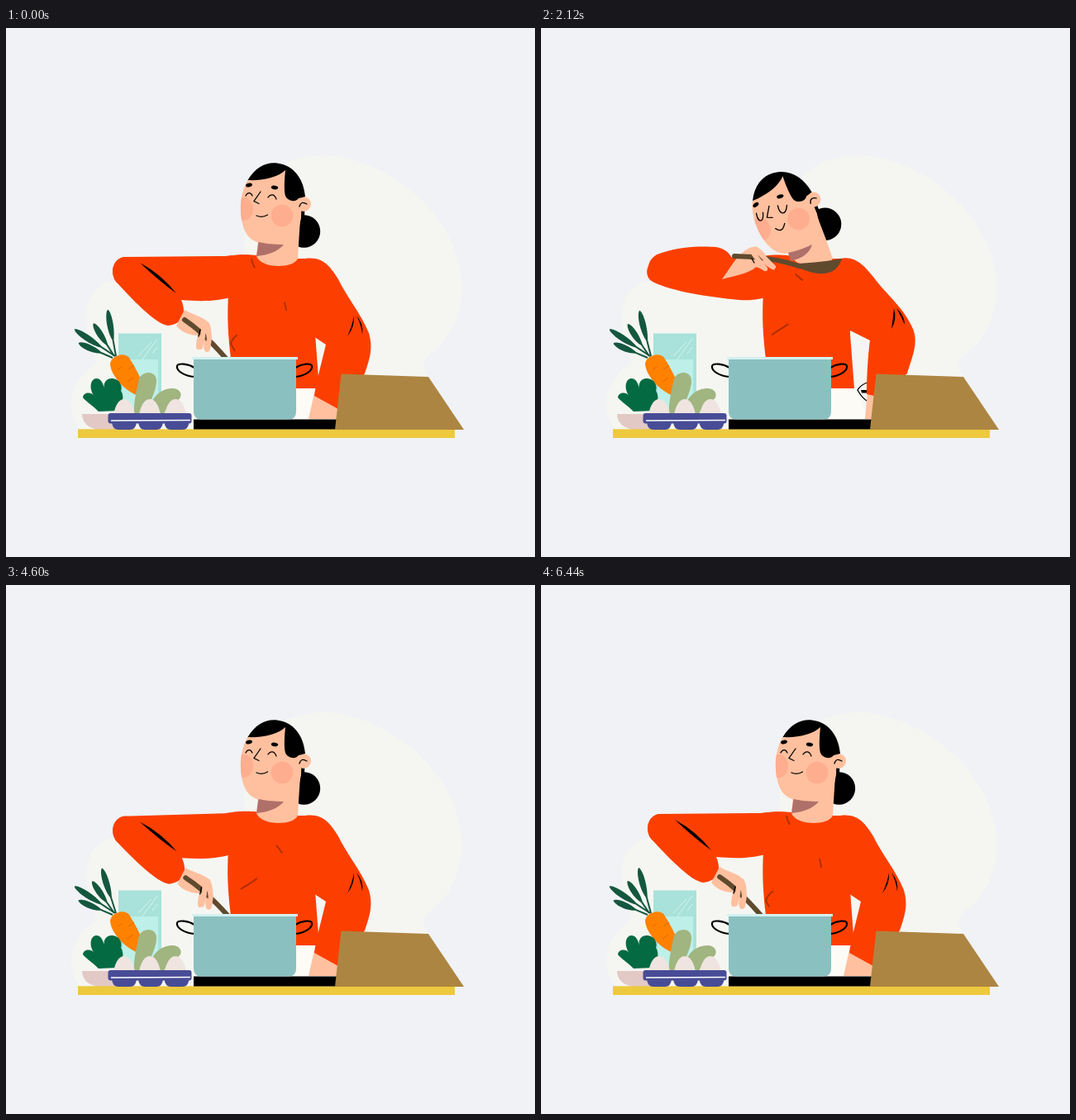
Write an HTML page that moves like this. It is 640 px wide and 640 px high and loops after 6480 ms.

```html
<!DOCTYPE html>
<html lang="en">
<head>
<meta charset="utf-8">
<title>Cooking</title>
<style>
html, body { margin: 0; width: 100%; height: 100%; overflow: hidden; background: #f0f2f5; }
svg { display: block; width: 100vw; height: 100vh; }
.line { fill: none; stroke: #000; stroke-width: 1.3; stroke-linecap: round; }
.skin { fill: #ffc09f; }
.top { fill: #fc3f00; }
.cheek { fill: #ffad8f; }
.crease { fill: none; stroke: #b02e00; stroke-width: 2; }
.finger { fill: none; stroke: #ffc09f; stroke-width: 6; stroke-linecap: round; }
</style>
</head>
<body>
<svg viewBox="0 0 640 640">
  <path fill="#f5f6f2" d="M90 486C70 460 78 425 110 405C95 370 85 315 130 306C220 300 285 320 289 262C285 200 320 154 385 154C450 154 551 220 551 315C551 355 530 385 512 395C500 405 508 415 510 422L540 486Z"/>
  <path fill="#fcfbf5" d="M340 434H380L396 473H340Z"/>

  <!-- glass -->
  <path fill="#a8e2da" d="M136 369.500H188V470H136Z"/>
  <path fill="#bdf0e8" d="M141 401H184V466H141Z"/>
  <path fill="none" stroke="#d5f5f0" d="M160 397L176 380M165 401L183 376M177 394L183 386"/>

  <!-- carrot and greens -->
  <g id="leaves" fill="#14573f"></g>
  <path fill="#ff8100" d="M126 407C126 397 143 391 149 399C158 413 168 432 170 447C152 447 128 425 126 407Z"/>
  <path fill="none" stroke="#dc6900" d="M135 413L140 410M148 413L155 408M147 428L154 423"/>
  <path fill="#046a41" d="M112 464C104 456 98 453 93 447C94 440 104 440 107 446C100 436 102 425 109 424C116 424 118 432 119 437C117 429 122 423 129 424C138 425 141 433 139 439C143 444 142 456 136 463Z"/>
  <path fill="#e3c9c5" d="M92 467H145V486H116C101 486 92 478 92 467Z"/>
  <g fill="#a1b580">
    <path d="M155 470C154 452 158 440 160 428C162 414 183 413 182 428C181 444 172 450 173 470Z"/>
    <path d="M170 470C175 446 187 436 202 436C214 437 215 449 204 452C195 456 192 465 190 470Z"/>
  </g>
  <g fill="#efe4df">
    <path id="egg" d="M130 468C132 456 137 449 143 449C149 449 154 456 156 468Z"/>
    <use href="#egg" x="31"/><use href="#egg" x="62"/>
  </g>
  <rect x="87" y="485.300" width="456" height="10.700" fill="#edc93d"/>
  <g fill="#484c96">
    <rect x="123.500" y="466" width="101" height="12.500" rx="3"/>
    <path id="cup" d="M128 477H158Q157 486 150 486H136Q129 486 128 477Z"/>
    <use href="#cup" x="32"/><use href="#cup" x="63.500"/>
  </g>
  <path stroke="#fff" stroke-width="1.500" d="M127 475L223 474.500"/>
  <rect x="227" y="473.500" width="187" height="12"/>

  <!-- cook -->
  <path class="line" d="M397 428Q386 432 383 438Q388 447 394 451"/>
  <path d="M387 438H398V441.500H388Z"/>
  <path id="torso" class="top"/>
  <path id="wrist" class="skin"/>
  <path id="sleeve" class="top"/>
  <path id="folds"/>
  <path id="upper" class="top"/>
  <path id="crease1" class="crease" d="M297 279C300 304 336 306 339 342" stroke-dasharray="12 55.400"/>
  <path id="crease2" class="crease" d="M310 346C304 362 276 366 272 382L277 391" stroke-dasharray="24 41"/>
  <g class="turn">
    <circle cx="360.500" cy="246" r="19.700"/>
    <path d="M350 205H362L361 228L365 232L354 240Z"/>
  </g>
  <path id="neck" class="skin"/>
  <g class="turn">
    <clipPath id="faceClip"><path id="face" d="M293 183C285 195 282 215 285 232C288 250 297 260 311 260L350 262L357 230L358 200L340 168Z"/></clipPath>
    <use href="#face" class="skin"/>
    <ellipse class="cheek" cx="287.500" cy="219" rx="11.500" ry="14" clip-path="url(#faceClip)"/>
    <circle class="cheek" cx="334" cy="227" r="13.300"/>
    <circle class="skin" cx="360" cy="213" r="9"/>
    <path d="M292.500 184C302 168 315 162 328 163.500C348 166 360 182 362 204L354 206C351 211 341 210 338 203C336 196 337 182 338 172C330 180 312 185 292.500 184Z"/>
    <ellipse cx="294" cy="190" rx="4" ry="2.300" transform="rotate(-14 294 190)"/>
    <ellipse cx="325" cy="193" rx="4.200" ry="2.300" transform="rotate(8 325 193)"/>
    <path class="line" d="M308 198L300 209.500L306 212.500M355 216Q357 208.500 364 213"/>
    <path id="eyes" class="line"/>
  </g>
  <path id="shade" fill="#b0706a"/>

  <g id="arm">
    <path id="fore" class="top"/>
    <path id="mark"/>
    <path id="hand" class="skin"/>
    <path id="handle" fill="none" stroke="#5f4a2e" stroke-width="6" stroke-linecap="round"/>
    <path id="bowl" fill="#5f4a2e"/>
    <path id="fingers" class="finger"/>
    <path id="grip" class="line"/>
  </g>

  <!-- pot and board -->
  <path class="line" style="stroke-width:2.200" d="M228 422C216 421 206 415 207 409C208 405 220 406 228 411M350 422C361 421 371 415 370 409C369 405 358 406 350 411"/>
  <path fill="#8bc0c1" d="M227 399H351V464Q351 473.500 342 473.500H236Q227 473.500 227 464Z"/>
  <path fill="#d3f1ef" d="M225 398H353V401H225Z"/>
  <path fill="#ad8542" d="M405.500 418.500L511 422L554 486H398Z"/>
</svg>
<script>
const LOOP = 6480, PIVOT = [332, 280.5], TILT = -24.5;
const $ = id => document.getElementById(id);
const set = (id, d) => $(id).setAttribute('d', d);
const clamp = x => Math.min(1, Math.max(0, x));
const smooth = x => (x = clamp(x)) * x * (3 - 2 * x);
const NUM = /-?\d+(\.\d+)?/g;

// blend two paths that share the same commands
function mix(a, b, k) {
  const to = b.match(NUM);
  let i = 0;
  return a.replace(NUM, v => (+v + (to[i++] - v) * k).toFixed(2));
}

// [stirring, tasting]
const body = {
  wrist: ['M373 442L366 473H404V455Z', 'M395 440L392 473H408V440Z'],
  sleeve: [
    'M362 279C383 276 392 288 402 304C412 325 428 343 439 369C444 386 441 398 434 418L402 461L373 445C375 430 383 400 387 383L372 373Z',
    'M362 279C381 275 392 289 402 301C418 323 439 338 450 364C457 381 449 398 443 418L408 446L394 443C394 430 395 400 398 378L372 365Z'],
  folds: [
    'M421 348Q422 362 413 373Q419 360 421 348M424 348Q433 358 431 371Q430 359 424 348',
    'M427 339Q431 353 424 364Q426 351 427 339M430 339Q440 348 440 359Q436 349 430 339']
};

const eyes = [
  'M317 205C320 200 325 201 327 207M290 203C292 199 296 198 298 203M303 227Q310 230 316.5 226',
  'M317.7 202C315 214 322 217 328 206M290.3 199.6C287 211 294 215 298 202M303.8 226Q309 235 316.3 225'];

// [stirring, lifting, lowering, tasting]
const arm = {
  upper: [
    'M304 275C285 273 275 275 265 276L143 277C128 280 125 298 134 308C165 318 190 327 212 329C235 331 255 331 275 325Z',
    'M304 277C285 276 270 275 250 275L143 274C128 277 125 300 136 308C160 318 190 324 212 327C235 329 255 330 275 326Z',
    'M304 276C285 275 275 275 262 277L142 290C126 293 127 318 137 326C160 332 190 334 212 330C240 332 258 334 275 336Z',
    'M304 277C285 276 278 277 275 278L150 277C128 277 122 300 135 307C160 319 200 325 240 329C255 330 265 328 275 325Z'],
  fore: [
    'M212 329C218 343 216 358 196 360C180 358 150 325 134 308C126 298 128 279 143 277C170 277 200 300 212 329Z',
    'M227 302C233 312 230 326 215 328C190 327 155 320 136 308C126 300 126 277 143 274C170 276 200 280 227 302Z',
    'M229 315C233 325 230 338 215 341C190 341 155 335 137 326C126 317 127 293 142 290C170 290 200 295 229 315Z',
    'M212 265C234 269 241 292 219 304C200 310 155 310 137 306C126 299 126 277 146 272C170 264 195 264 212 265Z'],
  mark: [
    'M162 284Q188 298 206 321Q184 305 162 284',
    'M155 275Q185 276 208 287Q180 284 155 275',
    'M152 290Q182 291 208 300Q178 298 152 290',
    'M155 270Q185 268 208 272Q180 270 155 270'],
  hand: [
    'M206 360L216 341C228 348 243 350 247 360C249 368 250 378 246 391C240 395 238 388 240 378L235 388C229 392 229 385 232 372C222 372 212 368 206 360',
    'M222 328L231 304C245 306 262 300 268 306C273 312 276 325 279 333C277 336 272 330 268 322L270 334C266 337 262 328 258 322C256 330 245 330 222 328',
    'M218 341L231 315C245 316 262 310 268 315C273 321 278 336 281 345C279 348 274 342 269 334L270 346C266 348 262 338 258 332C254 338 240 341 218 341',
    'M219 304L232 285C240 274 252 262 262 265C270 270 278 283 283 292C280 294 274 288 268 284L274 294C268 295 262 286 258 291C250 297 235 300 219 304'],
  handle: [
    'M216 353Q240 369 268 402', 'M234 308Q272 316 310 338',
    'M235 321Q275 329 310 346', 'M234 276Q282 277 312 288'],
  bowl: [
    'M264 400Q290 408 310 440Q285 450 264 400', 'M300 335Q325 344 360 343Q346 368 300 335',
    'M300 343Q325 349 363 347Q346 376 300 343', 'M300 285Q330 285 364 279Q354 312 300 285'],
  fingers: [
    'M243 358L246 376L244 388M239 362L238 374L235 386', 'M263 308L269 318L276 331M260 311L264 322L268 331',
    'M263 317L270 328L278 342M260 320L264 330L268 342', 'M262 270L271 279L281 289M258 274L264 282L271 291'],
  grip: [
    'M235 365L233 373', 'M254 314L257 321', 'M255 324L258 332', 'M255 279L258 284']
};

// base, length, angle, sway
const leaves = [[132, 397, 59, -56.5, 0], [129, 399, 45, -67, 0.5], [131, 397, 47, -34, 1.5], [133, 397, 57, -15, 5]];
$('leaves').innerHTML = leaves.map(([, , n]) =>
  `<path d="M-1 0L-1 ${-n * .35}C-6 ${-n * .6} -4 ${-n * .95} 0 ${-n}C4 ${-n * .95} 5 ${-n * .6} 1 ${-n * .35}L1 0Z"/>`).join('');

function turned(x, y, deg) {
  const a = deg * Math.PI / 180, c = Math.cos(a), s = Math.sin(a);
  x -= PIVOT[0]; y -= PIVOT[1];
  return (PIVOT[0] + x * c - y * s).toFixed(2) + ' ' + (PIVOT[1] + x * s + y * c).toFixed(2);
}

function draw(t) {
  const p = smooth((t - 250) / 980) - smooth((t - 3590) / 980);
  const lifting = t < 2400, mid = lifting ? .59 : .5;

  // the waist leans out slowly while tasting
  const lean = 4 * (smooth((t - 2000) / 1100) - smooth((t - 3800) / 900));
  set('torso', `M268 276C285 273 300 275 304 276L354 279H372C380 300 375 350 374 370L379 436H272L${272 - lean / 2} 400C${268.5 - lean} 370 ${267.5 - lean} 350 ${269 - lean} 322Z`);
  for (const id in body) set(id, mix(...body[id], p));
  for (const id in arm) {
    const [stir, up, down, taste] = arm[id], way = lifting ? up : down;
    set(id, p < mid ? mix(stir, way, p / mid) : mix(way, taste, (p - mid) / (1 - mid)));
  }
  $('mark').style.fill = `rgb(${Math.round(130 * clamp(p / mid))},${Math.round(28 * clamp(p / mid))},0)`;
  $('mark').style.opacity = clamp((1 - p) * 3);
  const stir = -.85 * (1 - Math.cos(t / LOOP * 16 * Math.PI)) * (1 - p);
  for (const id of ['arm', 'upper']) $(id).setAttribute('transform', `rotate(${stir} 275 290)`);

  const deg = TILT * p, at = (x, y) => turned(x, y, deg);
  document.querySelectorAll('.turn').forEach(g => g.setAttribute('transform', `rotate(${deg} ${PIVOT})`));
  set('eyes', mix(...eyes, smooth((p - .6) / .35)));
  set('neck', `M${at(306, 245)}L303 276C309 292 348 291 353 279L${at(354, 262)}L${at(357, 215)}Z`);
  set('shade', `M${at(305.5, 259)}Q${at(320, 262.5)} ${at(336, 262)}Q${at(326, 274)} ${303 - p} ${276 + 6 * p}Z`);

  $('crease1').style.strokeDashoffset = -67.4 * t / LOOP;
  $('crease2').style.strokeDashoffset = -40 - 325 * t / LOOP;

  const sway = Math.cos((t / 1710 - .02) * 2 * Math.PI);
  leaves.forEach(([x, y, , angle, k], i) =>
    $('leaves').children[i].setAttribute('transform', `translate(${x} ${y}) rotate(${angle + k * sway})`));
}

const start = performance.now();
function tick() {
  draw((performance.now() - start) % LOOP);
  requestAnimationFrame(tick);
}
tick();
</script>
</body>
</html>
```
